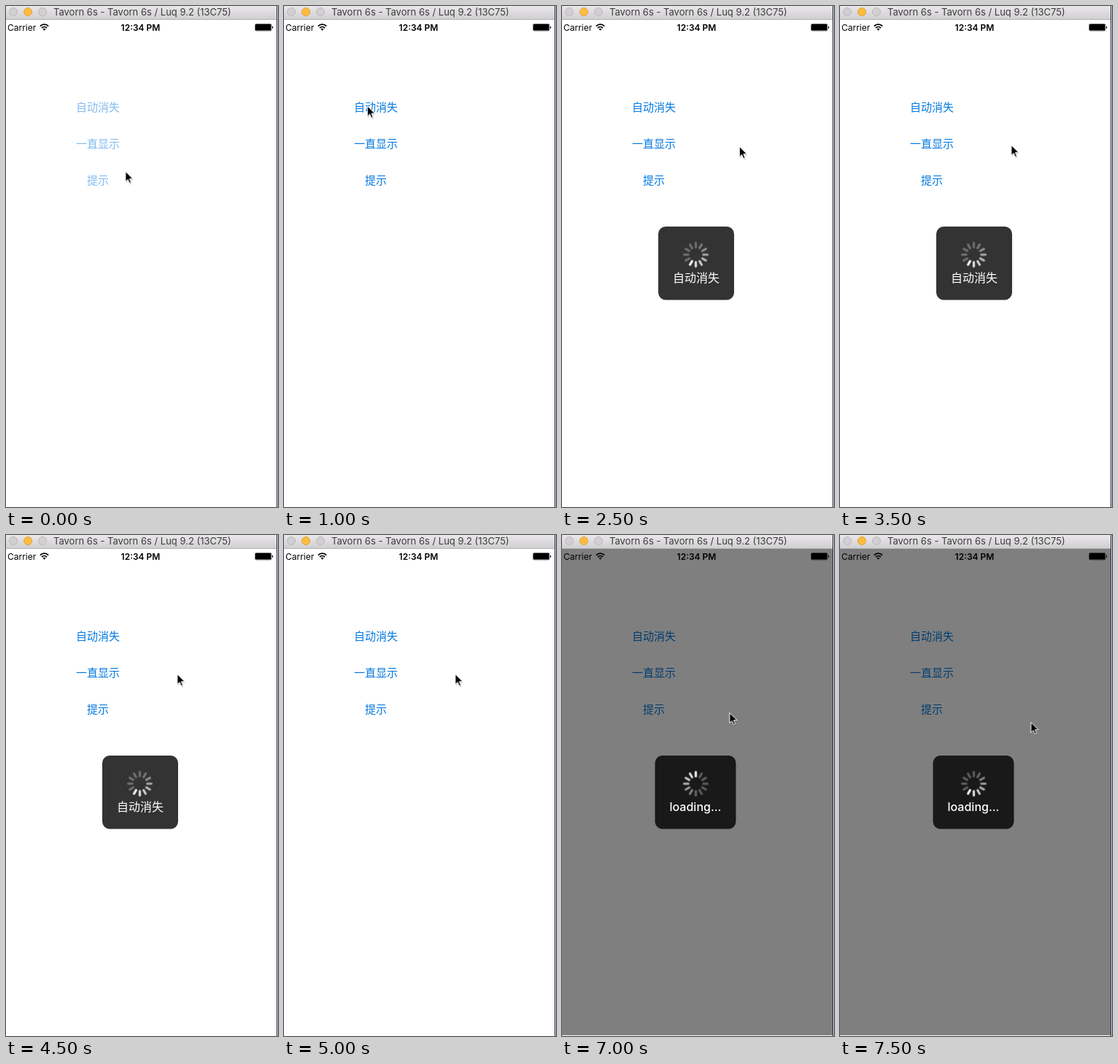
Animation, 373 px wide and 686 px high, one loop 8000 ms. Source, as an HTML page:

```html
<!DOCTYPE html>
<html lang="zh">
<head>
<meta charset="utf-8">
<title>Loading HUD demo</title>
<style>
  html, body { margin: 0; width: 100%; height: 100%; overflow: hidden; background: #fff; }
  svg { display: block; width: 373px; height: 686px; }
  text { font-family: Inter, "Noto Sans CJK SC", "Noto Sans CJK JP", "Noto Sans CJK", sans-serif; }
  .title { font-size: 13px; fill: #3d3c3d; }
  .status { font-size: 12px; }
  .button { font-size: 15px; fill: #057ae0; text-anchor: middle; }
  .label { font-size: 16px; fill: #fff; text-anchor: middle; }
  .spoke { stroke: #fff; stroke-width: 3; stroke-linecap: round; }

  .timed { animation: 8s step-end infinite; }
  #buttons { animation-name: wake; }
  #first { animation-name: press; }
  #toast { animation-name: toast; }
  #modal { animation-name: modal; }
  #pointer { animation-name: point; }
  .spin { animation: spin 1s step-end infinite; }

  @keyframes spin { 0% { transform: rotate(0deg); } 50%, 100% { transform: rotate(210deg); } }
  @keyframes wake { 0% { opacity: .5; } 6.25%, 100% { opacity: 1; } }
  @keyframes press { 0%, 31.25%, 100% { opacity: 1; } 25% { opacity: .82; } }
  @keyframes toast { 0%, 62.5%, 100% { opacity: 0; } 25% { opacity: .963; } 31.25% { opacity: 1; } }
  @keyframes modal { 0% { opacity: 0; } 87.5%, 100% { opacity: 1; } }
  @keyframes point {
    0% { transform: translate(163.5px, 226px); }
    6.25% { transform: translate(113.5px, 141px); }
    12.5% { transform: translate(114px, 136.5px); }
    31.25% { transform: translate(243px, 192px); }
    37.5% { transform: translate(234px, 187px); }
    43.75% { transform: translate(234.5px, 190px); }
    68.75% { transform: translate(138px, 182px); }
    75% { transform: translate(134px, 182px); }
    81.25% { transform: translate(132px, 186px); }
    87.5% { transform: translate(229.5px, 243px); }
    93.75%, 100% { transform: translate(261.5px, 256px); }
  }
</style>
</head>
<body>
<svg viewBox="0 0 373 686">
  <defs>
    <linearGradient id="chrome" x2="0" y2="1">
      <stop stop-color="#e9e7e9"/><stop offset="1" stop-color="#d1cfd1"/>
    </linearGradient>
  </defs>
  <rect width="373" height="686" fill="#fff"/>

  <g class="status">
    <text x="2" y="33.5">Carrier</text>
    <text x="184.5" y="33.5" text-anchor="middle" font-weight="600">12:34 PM</text>
    <g fill="none" stroke="#000" stroke-width="1.8">
      <path d="M46.8 27.6a8 8 0 0 1 11.4 0M49 30a5 5 0 0 1 7 0"/>
      <path d="M52.5 33.8l-2-2.2a3 3 0 0 1 4 0z" fill="#000" stroke="none"/>
    </g>
    <rect x="341.5" y="24.5" width="22.5" height="9.5" rx="1.8" fill="none" stroke="#000" stroke-width=".5"/>
    <rect x="342" y="25" width="21.5" height="8.5" rx=".8"/>
    <path d="M365 27.4a2 2 0 0 1 0 3.7z"/>
  </g>

  <g id="buttons" class="timed button">
    <text id="first" class="timed" x="126" y="144">自动消失</text>
    <text x="126" y="194">一直显示</text>
    <text x="126" y="244">提示</text>
  </g>

  <g id="toast" class="timed">
    <rect x="132" y="302" width="104" height="100.5" rx="10" fill-opacity=".8"/>
    <g class="spinner" transform="translate(183.5 340.5)"></g>
    <text class="label" x="184" y="378">自动消失</text>
  </g>

  <g id="modal" class="timed">
    <rect y="18" width="371" height="667" fill-opacity=".5"/>
    <rect x="127.5" y="302" width="111" height="100.5" rx="10" fill-opacity=".8"/>
    <g class="spinner" transform="translate(183.5 340.5)"></g>
    <text class="label" x="183" y="378" font-weight="550">loading...</text>
  </g>

  <rect width="371" height="18" fill="url(#chrome)"/>
  <rect y="18" width="371" height="1" fill="#b3b1b3"/>
  <g stroke-width="1">
    <circle cx="10" cy="8" r="5.5" fill="#d1cfd1" stroke="#bbb9bb"/>
    <circle cx="30" cy="8" r="5.5" fill="#fdbc40" stroke="#e2a23a"/>
    <circle cx="50" cy="8" r="5.5" fill="#d1cfd1" stroke="#bbb9bb"/>
  </g>
  <text class="title" x="65" y="13">Tavorn 6s - Tavorn 6s / Luq 9.2 (13C75)</text>
  <rect x="371" width="1" height="686" fill="#2a2d3c"/>
  <rect x="372" width="1" height="686" fill="#d5d9e8"/>

  <g id="pointer" class="timed">
    <path d="M1 2v14.5l3.4-3.1 2.2 5 2.4-1-2.2-4.9H11.5z" opacity=".2"/>
    <path d="M.3 .5v14.2l3.3-3.1 2.2 5.1 2.3-1-2.2-5h4.6z" stroke="#fff" stroke-width="1"/>
  </g>
</svg>
<script>
  const SPOKES = 12;
  const spokes = Array.from({ length: SPOKES }, (_, i) => {
    const age = (SPOKES - i) % SPOKES;
    const opacity = Math.max(0.3, 1 - age * 0.11);
    return `<path class="spoke" d="M0-10.3V-16" opacity="${opacity}" transform="rotate(${i * 360 / SPOKES})"/>`;
  }).join('');
  for (const spinner of document.querySelectorAll('.spinner')) {
    spinner.innerHTML = `<g class="spin">${spokes}</g>`;
  }
</script>
</body>
</html>
```
